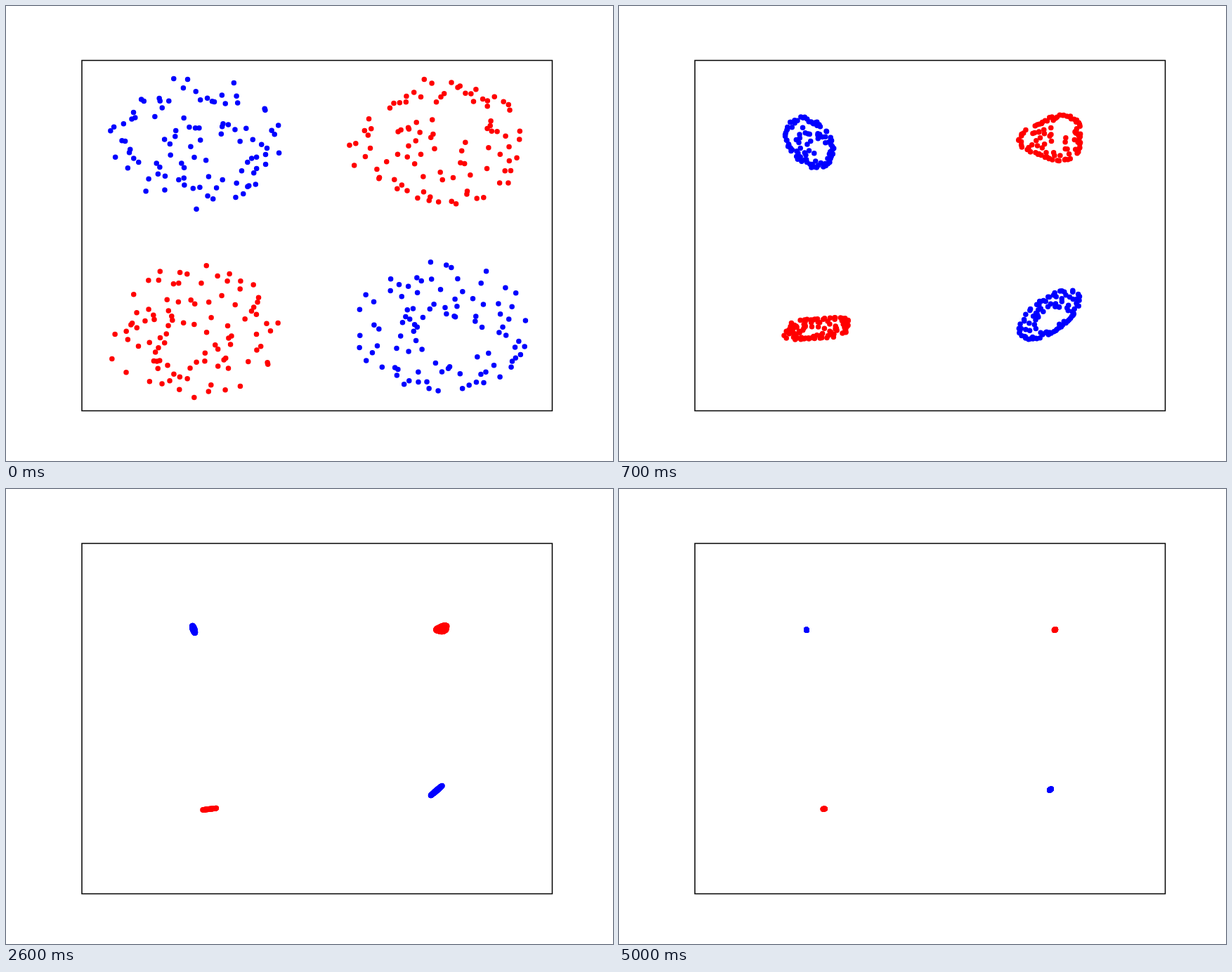
Recreate the animation shown at these times as an HTML page with a canvas. Size 864 px wide and 648 px high, loop 5100 ms.

```html
<!DOCTYPE html>
<html lang="en">
<head>
<meta charset="utf-8">
<title>Converging clusters</title>
<style>
  html, body { margin: 0; width: 100%; height: 100%; overflow: hidden; background: #fff; }
  canvas { display: block; }
</style>
</head>
<body>
<canvas id="stage" width="864" height="648"></canvas>
<script>
const STEP = 100, STEPS = 51;
const RADIUS = 95, ASPECT = 1.343, DOT = 3.75, COUNT = 97;
const RAD = Math.PI / 180;

// disc, mean: start and end centre; angle: slow axis in degrees
// size, rate, shift: for the slow and the fast axis
// bulge: amount, direction and lobes of the outline; hole: empty spot x, y, r
const clusters = [
  {
    color: '#00f', seed: 11, disc: [272.5, 195], mean: [267, 200.7],
    angle: 78, size: [72, 73], rate: [0.1, 0.155], shift: [-0.15, -0.18],
    bulge: [0.09, 47, 2], hole: [0.35, 0.2, 0.22]
  },
  {
    color: '#f00', seed: 23, disc: [615, 194], mean: [620.5, 200.7],
    angle: -30, size: [61.8, 64.5], rate: [0.088, 0.106], shift: [0.14, -0.38],
    bulge: [0.12, 58, 3], hole: [0.2, -0.3, 0.22]
  },
  {
    color: '#f00', seed: 37, disc: [265, 463], mean: [292, 455.5],
    angle: -9, size: [65.2, 63], rate: [0.083, 0.205], shift: [-0.23, 0.18],
    bulge: [0.09, 45, 4], hole: [-0.05, 0.15, 0.22]
  },
  {
    color: '#00f', seed: 52, disc: [618.5, 457.5], mean: [614.3, 427.8],
    angle: -49, size: [70.9, 78], rate: [0.08, 0.18], shift: [-0.24, 0.31],
    bulge: [0.06, -49, 2], hole: [0.17, 0.2, 0.34]
  }
];

function randomFrom(seed) {
  return () => {
    seed = (seed + 0x6D2B79F5) | 0;
    let t = Math.imul(seed ^ (seed >>> 15), 1 | seed);
    t = (t + Math.imul(t ^ (t >>> 7), 61 | t)) ^ t;
    return ((t ^ (t >>> 14)) >>> 0) / 4294967296;
  };
}

// Unit-disc points, one per sector so that the whole rim is covered
function scatter({ seed, hole }) {
  const random = randomFrom(seed), points = [];
  while (points.length < COUNT) {
    const r = Math.sqrt(random());
    const a = 2 * Math.PI * (points.length + random()) / COUNT;
    const x = r * Math.cos(a), y = r * Math.sin(a);
    if (Math.hypot(x - hole[0], y - hole[1]) > hole[2]) points.push([x, y]);
  }
  return points;
}

// Averaging pushes points towards the edge of the shrinking shape
function settle([x, y], { angle, bulge: [amount, direction, lobes] }) {
  const a = Math.atan2(y, x);
  const r = Math.sin(Math.hypot(x, y) * Math.PI / 2)
    * (1 + amount * Math.cos(lobes * (a - direction * RAD)));
  return [r * Math.cos(a - angle * RAD), r * Math.sin(a - angle * RAD)];
}

for (const c of clusters) {
  c.points = scatter(c).map(start => ({ start, end: settle(start, c) }));
}

const ctx = document.getElementById('stage').getContext('2d');

function drawCluster(c, n) {
  const loose = Math.exp(-n), tight = 1 - loose;
  const [cx, cy] = c.mean.map((m, i) => m + (c.disc[i] - m) * loose);
  const [su, sv] = c.size.map((s, i) => s * Math.exp(-c.rate[i] * n));
  const cos = Math.cos(c.angle * RAD), sin = Math.sin(c.angle * RAD);
  ctx.fillStyle = c.color;
  for (const { start, end } of c.points) {
    const u = su * (end[0] + c.shift[0]), v = sv * (end[1] + c.shift[1]);
    const x = loose * RADIUS * start[0] + tight * (u * cos - v * sin);
    const y = loose * RADIUS * start[1] + tight * (u * sin + v * cos);
    ctx.beginPath();
    ctx.arc(cx + x * ASPECT, cy + y, DOT, 0, 2 * Math.PI);
    ctx.fill();
  }
}

function draw(n) {
  ctx.fillStyle = '#fff';
  ctx.fillRect(0, 0, 864, 648);
  for (const c of clusters) drawCluster(c, n);
  ctx.strokeStyle = '#000';
  ctx.lineWidth = 1.5;
  ctx.strokeRect(108, 77.5, 669.5, 499);
}

let shown = -1;
const begin = performance.now();
function tick() {
  const n = Math.floor((performance.now() - begin) / STEP) % STEPS;
  if (n !== shown) draw(shown = n);
  requestAnimationFrame(tick);
}
tick();
</script>
</body>
</html>
```
